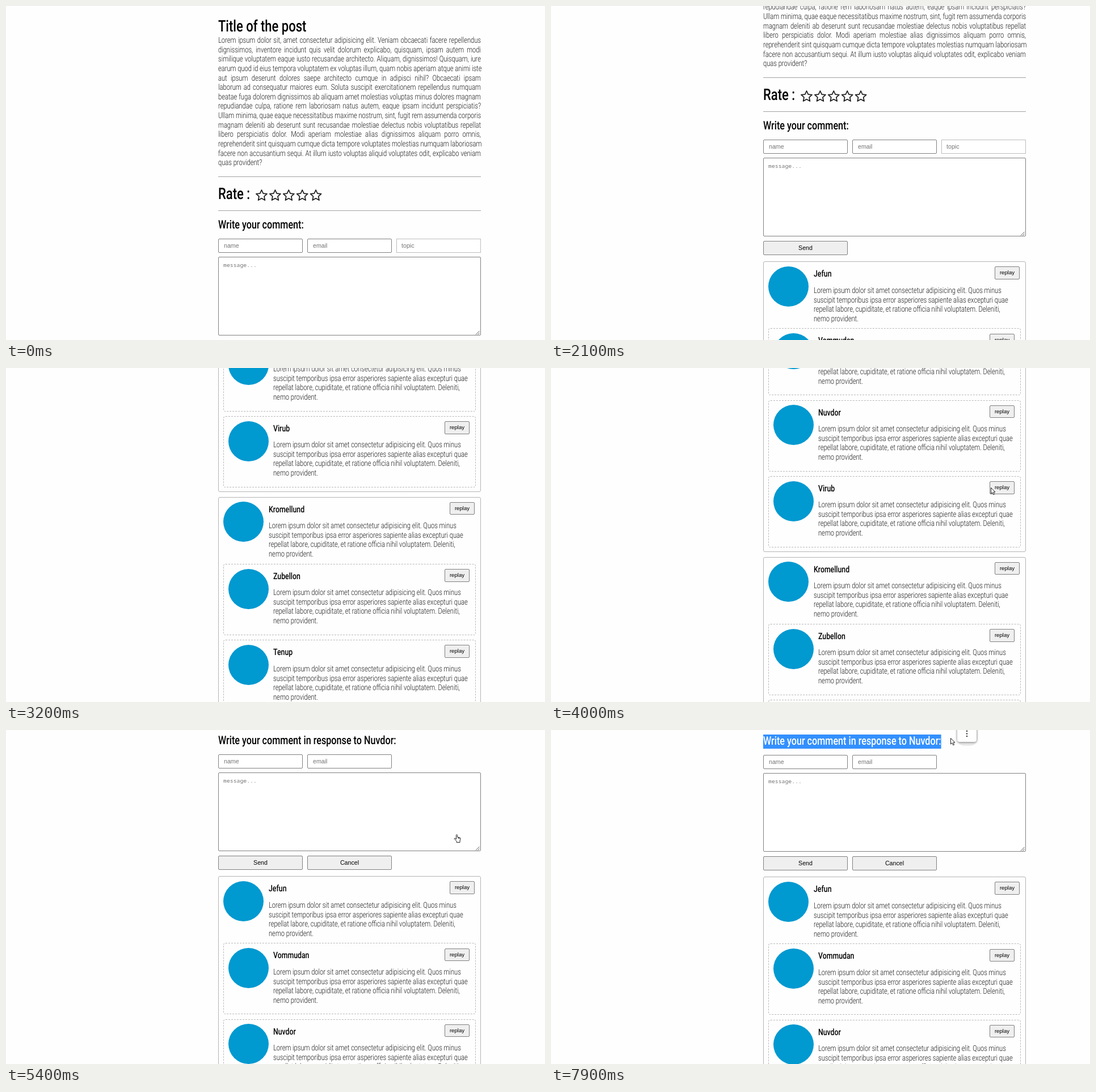
An HTML page for the animation above (8 s loop, 950 by 590 pixels).

```html
<!DOCTYPE html>
<html lang="en">
<head>
<meta charset="utf-8">
<title>Post comments</title>
<style>
  html, body { margin: 0; width: 100%; height: 100%; overflow: hidden; background: #fefefe; }
  #stage { position: relative; width: 950px; height: 590px; overflow: hidden; background: #fefefe; }
  #page { position: absolute; left: 0; top: 0; width: 950px; height: 1550px; }
  #page *, .pointer, #popup { position: absolute; box-sizing: border-box; }
  .narrow {
    font: 300 14.2px/16.62px Roboto, sans-serif; color: #1c1c1c; white-space: nowrap;
    text-rendering: geometricPrecision; transform: scaleX(.785); transform-origin: 0 50%;
  }
  #page .narrow div { position: static; }
  .justified div { text-align: justify; text-align-last: justify; }
  .justified div:last-child { text-align-last: left; }
  .title { font-size: 28px; line-height: 34px; font-weight: 500; color: #000; }
  .heading { font-size: 20.6px; line-height: 25px; font-weight: 500; color: #000; }
  .name { font-size: 15.7px; line-height: 20px; font-weight: 500; color: #000; }
  .picked { color: #fff; background: #3390ff; }
  .rule { width: 463px; height: 1px; background: #a2a2a2; }
  .field, .button {
    border: 1px solid #808080; border-radius: 2px;
    font: 10.67px/23px "Liberation Sans", Arial, sans-serif;
  }
  .field { padding-left: 9px; color: #757575; background: #fff; }
  .topic { padding-left: 8px; border-color: #bdbdbd; border-radius: 0; }
  .message { font: 9.8px/14px "Noto Sans Mono", monospace; padding: 7px 8px; }
  .button { text-align: center; color: #000; background: #efefef; }
  .small { font-size: 9.6px; line-height: 19px; }
  .card { border: 1px solid #b4b4b4; border-radius: 3px; }
  .reply { border: 1px dashed #b8b8b8; border-radius: 4px; }
  .avatar { width: 71px; height: 71px; border-radius: 50%; background: #0099d0; }
  .pointer { left: 0; top: 0; overflow: visible; }
  #popup { left: 715px; top: -10px; width: 37px; height: 38px; border-radius: 0 0 14px 14px; background: #ececec; }
  #popup svg { position: absolute; left: 1px; top: 0; background: #fff; border-radius: 4px; box-shadow: 0 1px 4px #0007; }
</style>
</head>
<body>
<div id="stage">
  <div id="page"></div>
  <div id="popup">
    <svg width="34" height="31" fill="#444">
      <circle cx="17" cy="12" r="1.3"/><circle cx="17" cy="16.5" r="1.3"/><circle cx="17" cy="21" r="1.3"/>
    </svg>
  </div>
  <svg id="arrow" class="pointer" width="14" height="18" fill="#fff" stroke="#222" stroke-width="1">
    <path d="M.5 .5V11L3 8.8L4.8 12.8L6.6 12L4.9 8.1H8Z"/>
  </svg>
  <svg id="hand" class="pointer" width="14" height="18" fill="#fff" stroke="#222" stroke-width="1" stroke-linejoin="round">
    <path d="M2.5 9V1.4Q3.5 -.4 4.6 1.4V5.2L8.6 6Q10 6.3 9.9 8L9 12V14.6H3.2V12.4L-.8 8.4Q-.8 6.7 .8 7.4ZM6.2 5.6V8M8 6V8"/>
  </svg>
</div>
<script>
const $ = id => document.getElementById(id);
const page = $('page');

function add(parent, cls, x, y, w, h, html = '') {
  const el = document.createElement('div');
  el.className = cls;
  el.style.left = x + 'px';
  el.style.top = y + 'px';
  if (w) el.style.width = w + 'px';
  if (h) el.style.height = h + 'px';
  el.innerHTML = html;
  parent.append(el);
  return el;
}

const lines = list => list.map(s => `<div>${s}</div>`).join('');

const article = [
  'Lorem ipsum dolor sit, amet consectetur adipisicing elit. Veniam obcaecati facere repellendus',
  'dignissimos, inventore incidunt quis velit dolorum explicabo, quisquam, ipsam autem modi',
  'similique voluptatem eaque iusto recusandae architecto. Aliquam, dignissimos! Quisquam, iure',
  'earum quod id eius tempora voluptatem ex voluptas illum, quam nobis aperiam atque animi iste',
  'aut ipsum deserunt dolores saepe architecto cumque in adipisci nihil? Obcaecati ipsam',
  'laborum ad consequatur maiores eum. Soluta suscipit exercitationem repellendus numquam',
  'beatae fuga dolorem dignissimos ab aliquam amet molestias voluptas minus dolores magnam',
  'repudiandae culpa, ratione rem laboriosam natus autem, eaque ipsam incidunt perspiciatis?',
  'Ullam minima, quae eaque necessitatibus maxime nostrum, sint, fugit rem assumenda corporis',
  'magnam deleniti ab deserunt sunt recusandae molestiae delectus nobis voluptatibus repellat',
  'libero perspiciatis dolor. Modi aperiam molestiae alias dignissimos aliquam porro omnis,',
  'reprehenderit sint quisquam cumque dicta tempore voluptates molestias numquam laboriosam',
  'facere non accusantium sequi. At illum iusto voluptas aliquid voluptates odit, explicabo veniam',
  'quas provident?'
];
const remark = [
  'Lorem ipsum dolor sit amet consectetur adipisicing elit. Quos minus',
  'suscipit temporibus ipsa error asperiores sapiente alias excepturi quae',
  'repellat labore, cupiditate, et ratione officia nihil voluptatem. Deleniti,',
  'nemo provident.'
];

function starPath(cx, cy) {
  const pts = Array.from({ length: 10 }, (_, i) => {
    const a = Math.PI * (i / 5 - .5), r = i % 2 ? 4.8 : 10;
    return (cx + r * Math.cos(a)).toFixed(2) + ' ' + (cy + r * Math.sin(a)).toFixed(2);
  });
  return 'M' + pts.join('L') + 'Z';
}

// Post and rating
add(page, 'narrow title', 374, 19, 0, 0, 'Title of the post');
add(page, 'narrow justified', 374, 52.7, 463 / .785, 0, lines(article));
add(page, 'rule', 374, 301);
add(page, 'narrow title', 374, 315, 0, 0, 'Rate :');
const stars = [0, 1, 2, 3, 4].map(i => starPath(450.5 + i * 23.9, 335)).join('');
add(page, '', 0, 0, 0, 0, `<svg width="950" height="400" fill="none" stroke="#1c1c1c"
  stroke-width="1.7" stroke-linejoin="round"><path d="${stars}"/></svg>`);
add(page, 'rule', 374, 361);

// Form
const answer = 'Write your comment in response to Nuvdor:';
const plain = [add(page, 'narrow heading', 374, 375, 0, 0, 'Write your comment:')];
const response = [add(page, 'narrow heading', 374, 375, 0, 0, answer)];
const picked = add(page, 'narrow heading picked', 374, 375, 0, 0, answer);
add(page, 'field', 374, 411, 149, 25, 'name');
add(page, 'field', 531, 411, 149, 25, 'email');
plain.push(add(page, 'field topic', 688, 411, 149, 25, 'topic'));
add(page, 'field message', 374, 443, 463, 139, `message...
  <svg style="right:1px;bottom:0" width="8" height="8" stroke="#555"><path d="M1 7.5L7.5 1M4.5 7.5L7.5 4.5"/></svg>`);
add(page, 'button', 374, 590, 149, 25, 'Send');
response.push(add(page, 'button', 531, 590, 149, 25, 'Cancel'));

// Comments
function comment(cls, x, y, w, h, name) {
  add(page, cls, x, y, w, h);
  add(page, 'avatar', x + 9, y + 8.8);
  add(page, 'narrow name', x + 88.5, y + 12, 0, 0, name);
  add(page, 'narrow', x + 88.5, y + 43.6, 0, 0, lines(remark));
  add(page, 'button small', x + w - 55, y + 9.3, 44, 22.5, 'replay');
}

function thread(y, name, replies) {
  comment('card', 374, y, 463, 118.5 + replies.length * 134.3, name);
  replies.forEach((who, i) => comment('reply', 382.5, y + 118.2 + i * 134.3, 445.5, 126, who));
}

thread(626, 'Jefun', ['Vommudan', 'Nuvdor', 'Virub']);
thread(1155.6, 'Kromellund', ['Zubellon', 'Tenup']);

// Motion: rows of [ms, values...]
const scroll = [
  [1800, 0], [1900, 35], [2000, 100], [2100, 175], [2500, 540], [2600, 540],
  [2700, 600], [2800, 683], [3200, 928], [3300, 948], [3500, 960], [3800, 960],
  [3900, 900], [4000, 822], [4200, 760], [4600, 722], [4800, 722], [5000, 709],
  [5100, 709], [5200, 620], [5300, 440], [5400, 368], [5500, 367]
];
const pointer = [
  [3500, 716, 206], [3600, 775, 211], [4600, 775, 211], [4900, 791, 184], [5600, 791, 184],
  [6200, 640, 60], [6300, 640, 60], [6700, 345, 24], [6900, 372, 20], [7200, 466, 20],
  [7300, 600, 20], [7400, 600, 20], [7600, 694, 18], [7700, 694, 18], [7800, 704, 14]
];
const selection = [
  [6900, 0], [7200, .29], [7300, .72], [7400, .72], [7600, 1]
];

function at(rows, t) {
  const i = rows.findIndex(r => r[0] > t);
  if (i < 0) return rows[rows.length - 1].slice(1);
  if (i === 0) return rows[0].slice(1);
  const a = rows[i - 1], b = rows[i], k = (t - a[0]) / (b[0] - a[0]);
  return a.slice(1).map((v, j) => v + (b[j + 1] - v) * k);
}

const show = (el, on) => { el.style.visibility = on ? 'visible' : 'hidden'; };

function draw(now) {
  const t = Math.floor(now % 8000 / 100) * 100;
  const replying = t >= 5100, overButton = t >= 4700 && t < 5700;
  const [x, y] = at(pointer, t), [part] = at(selection, t);
  page.style.transform = `translateY(${-Math.round(at(scroll, t)[0])}px)`;
  plain.forEach(el => show(el, !replying));
  response.forEach(el => show(el, replying));
  show(picked, part > 0);
  picked.style.clipPath = `inset(0 ${(1 - part) * 100}% 0 0)`;
  for (const el of [$('arrow'), $('hand')]) el.style.transform = `translate(${x}px, ${y}px)`;
  show($('arrow'), t >= 3500 && !overButton);
  show($('hand'), overButton);
  show($('popup'), t >= 7800);
}

const start = performance.now();
function tick() {
  draw(performance.now() - start);
  requestAnimationFrame(tick);
}
tick();
</script>
</body>
</html>
```
